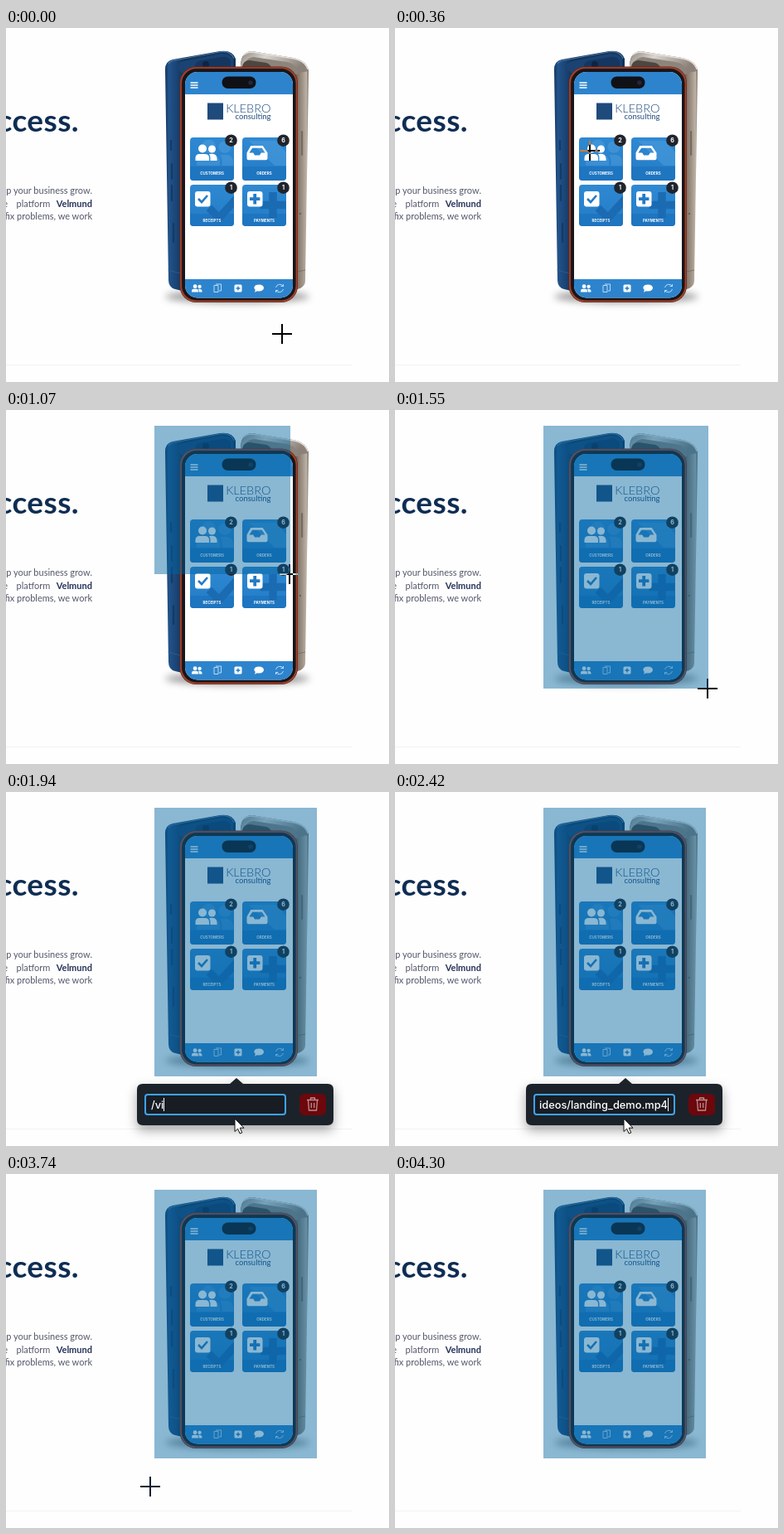
Write an HTML page that moves like this. It is 462 by 427 pixels and loops after 4690 ms.

```html
<!DOCTYPE html>
<html lang="en">
<head>
<meta charset="utf-8">
<title>Select an area and attach a video</title>
<style>
  html, body { margin: 0; width: 100%; height: 100%; overflow: hidden; background: #fefefe; }
  svg { display: block; }
  text { font-family: Lato, "Open Sans", sans-serif; }
  .end { text-anchor: end; }
  .mid { text-anchor: middle; }
  .title { font-size: 37px; font-weight: 700; letter-spacing: .4px; fill: #0f2d53; }
  .copy { font-size: 11px; fill: #54586a; }
  .copy .strong { font-weight: 700; fill: #26335a; }
  .logo { font-weight: 300; fill: #1f4a7c; }
  .label { font: 700 4.5px Inter, sans-serif; fill: #fff; }
  .count { font: 700 7.2px Inter, sans-serif; fill: #fff; }
  .path { font: 500 12.8px Inter, sans-serif; fill: #fff; }
  .cross { mix-blend-mode: difference; }
</style>
</head>
<body>
<svg width="462" height="427" viewBox="0 0 462 427">
  <defs>
    <linearGradient id="navy" gradientUnits="userSpaceOnUse" x1="192" y1="0" x2="214" y2="0">
      <stop offset="0" stop-color="#14365e"/>
      <stop offset=".2" stop-color="#22538a"/>
      <stop offset=".55" stop-color="#1b477a"/>
      <stop offset="1" stop-color="#123458"/>
    </linearGradient>
    <linearGradient id="metal" gradientUnits="userSpaceOnUse" x1="348" y1="0" x2="365" y2="0">
      <stop offset="0" stop-color="#5a5047"/>
      <stop offset=".3" stop-color="#897d71"/>
      <stop offset=".6" stop-color="#a3978a"/>
      <stop offset=".85" stop-color="#bdb2a6"/>
      <stop offset="1" stop-color="#776c61"/>
    </linearGradient>
    <linearGradient id="silver" x1="0" y1="0" x2="1" y2=".35">
      <stop offset="0" stop-color="#8f8780"/>
      <stop offset=".4" stop-color="#d9d5d0"/>
      <stop offset="1" stop-color="#8b8178"/>
    </linearGradient>
    <linearGradient id="tile" x1="0" y1="0" x2="0" y2="1">
      <stop offset="0" stop-color="#2f89d2"/>
      <stop offset="1" stop-color="#237bc6"/>
    </linearGradient>
    <filter id="soft" x="-30%" y="-100%" width="160%" height="300%"><feGaussianBlur stdDeviation="4"/></filter>
    <filter id="drop" x="-20%" y="-40%" width="140%" height="200%">
      <feDropShadow dx="0" dy="6" stdDeviation="7" flood-color="#000" flood-opacity=".35"/>
    </filter>
    <clipPath id="screen"><rect x="216" y="53" width="130" height="272.500" rx="15"/></clipPath>
    <clipPath id="cards">
      <path d="M222 132h53v52h-53zM285 132h53v52h-53zM222 189h53v50h-53zM285 189h53v50h-53z"/>
    </clipPath>
    <clipPath id="field"><rect x="174" y="365" width="158" height="24"/></clipPath>
    <g id="people">
      <circle cx="20" cy="6" r="4.500"/>
      <path d="M18 20v-4q0-2-1.500-4q9-1.500 9.500 5v3z"/>
      <circle cx="8.500" cy="5.500" r="5"/>
      <path d="M0 20v-3q0-5 5-5h6.500q5 0 5 5v3z"/>
    </g>
    <path id="tray" fill-rule="evenodd" d="M5 1h15l6 9v7q0 2-2 2H2q-2 0-2-2v-7zM7 4l-4 6h5l2 3h6l2-3h5l-4-6z"/>
    <rect id="box" width="18.500" height="18.500" rx="3"/>
    <path id="check" d="M4 9l4 4l7-8" fill="none" stroke-width="2.600"/>
    <path id="plus" d="M9.200 3v12.400M3 9.200h12.400" fill="none" stroke-width="3.800"/>
  </defs>

  <rect width="462" height="427" fill="#fefefe"/>
  <rect y="406" width="417" height="1" fill="#f2f2f2"/>
  <text class="end title" x="88" y="125">ccess.</text>
  <g class="copy">
    <text class="end" x="104" y="199.500">p your business grow.</text>
    <text class="end" x="2" y="215.500">e</text>
    <text x="12.500" y="215.500">platform</text>
    <text class="end strong" x="104" y="215.500">Velmund</text>
    <text class="end" x="104" y="230.500">fix problems, we work</text>
  </g>

  <!-- rear phones -->
  <ellipse cx="279" cy="324" rx="87" ry="8" fill="#555" opacity=".55" filter="url(#soft)"/>
  <path d="M192 50Q192 40 201 38L258 28Q273 26 277 37V60L225 320L204 315Q196 313 196 304Z" fill="url(#navy)"/>
  <path d="M205 48Q207 42 214 40L258 31Q271 30 274 38V54H212Z" fill="#1a4374"/>
  <path d="M196 43Q198 40 203 39L258 29Q271 27 275 37" fill="none" stroke="#4b76a6" stroke-width="1.200"/>
  <path d="M228 45q1-5 8-6l24-4q9-1 11 5v8h-43z" fill="#14365f"/>
  <circle cx="241" cy="44" r="4" fill="#0d2444"/>
  <path d="M199 136v11M200 164v18M200 190v18M202 236v22" stroke="#143a67" stroke-width="2.200" stroke-linecap="round"/>
  <path d="M195.500 292l15 4" stroke="#3b628f" stroke-width=".7"/>
  <path d="M283 44Q284 29 296 28L346 36Q363 39 365 52L361 305Q361 311 355 314L335 320L283 54Z" fill="url(#metal)"/>
  <path d="M283 46Q284 29 296 28L346 36Q363 39 365 52L353 54L283 53Z" fill="url(#silver)"/>
  <path d="M287 48Q288 36 299 35L338 41Q351 43 353 56L284 53Z" fill="#8d847b"/>
  <path d="M286 33Q290 29 297 29L345 36.500Q361 39 364 50" fill="none" stroke="#e6e1db" stroke-width="1.300"/>
  <path d="M285 47q1-8 9-8l20 3q6 2 7 9z" fill="#4d4641"/>
  <path d="M357 125v28" stroke="#766a5f" stroke-width="2.200" stroke-linecap="round"/>
  <path d="M351 294l10-2" stroke="#6f6459" stroke-width=".7"/>
  <circle cx="355" cy="224" r="1" fill="#5c5248"/>

  <!-- front phone -->
  <rect x="209.500" y="46.500" width="142.500" height="284.500" rx="20" fill="#5d2a20"/>
  <rect x="211" y="48" width="139.500" height="281.500" rx="18.500" fill="none" stroke="#a9422b" stroke-width="1.600"/>
  <rect x="212.300" y="49.300" width="137" height="279" rx="17.500" fill="#17161a"/>
  <g clip-path="url(#screen)">
    <rect x="216" y="53" width="130" height="273" fill="#fff"/>
    <rect x="216" y="53" width="130" height="27" fill="#2d84cd"/>
    <rect x="216" y="303" width="130" height="23" fill="#2d84cd"/>
  </g>
  <rect x="260.500" y="58.500" width="41" height="14.500" rx="7.200" fill="#101116"/>
  <circle cx="295" cy="66" r="2.800" fill="#20263d"/>
  <path d="M222.500 66h9M222.500 69h9M222.500 72h9" stroke="#fff" stroke-width="1.300"/>
  <rect x="243" y="90.500" width="19" height="20" fill="#1f4a7c"/>
  <g class="logo">
    <text class="end" x="319.500" y="102" font-size="14.500">KLEBRO</text>
    <text class="end" x="319.500" y="110" font-size="9.500" font-weight="400">consulting</text>
  </g>

  <g id="tiles"></g>
  <g clip-path="url(#cards)">
    <use href="#people" transform="translate(230 134) scale(1.7 1.6)" fill="#5aa5e2" opacity=".4"/>
    <path d="M293 136h33l12 14v16h-14z" fill="#4a9bdd" opacity=".6"/>
    <path d="M245 217l12 12l21-23" fill="none" stroke="#1b6bb3" stroke-width="9.500"/>
    <path d="M322 198v31M306.500 213.500h31" stroke="#1b6bb3" stroke-width="9.500"/>
  </g>
  <g fill="#fff">
    <use href="#people" transform="translate(228.500 140)"/>
    <use href="#tray" transform="translate(290.500 141) scale(.96)"/>
    <use href="#box" x="228" y="197"/>
    <use href="#box" x="291" y="197"/>
    <use href="#people" transform="translate(224 309) scale(.48)"/>
    <rect x="275.500" y="309.500" width="9" height="9" rx="1.500"/>
    <path d="M305 309.500c8 0 8 8 0 8q-1 0-2-.3l-3 1.600l.8-2.800c-3-3-1-6.500 4.200-6.500z"/>
  </g>
  <g stroke="#247bc6">
    <use href="#check" x="228" y="197"/>
    <use href="#plus" x="291" y="197"/>
    <path d="M280 311.500v5M277.500 314h5" stroke-width="1.400"/>
  </g>
  <g fill="none" stroke="#cfe4f6" stroke-width=".9">
    <path d="M251 310.500h5v8h-5zM253 309h6.500v8H257"/>
    <path d="M325.500 313a5 5 0 0 1 9-1.500v-2.500M334.500 311.500h-3M334.500 315a5 5 0 0 1-9 1.500v2.500M325.500 316.500h3"/>
  </g>
  <g id="badges"></g>

  <path id="cross" class="cross" d="M-12-1H-1V-12H1V-1H12V1H1V12H-1V1H-12Z"/>
  <rect id="area" x="179" y="19" fill="#00629d" fill-opacity=".46"/>

  <g id="popup">
    <path filter="url(#drop)" fill="#1d232a" d="M165 352h105l8-7l8 7h102q7 0 7 7v36q0 7-7 7H165q-7 0-7-7v-36q0-7 7-7z"/>
    <rect x="168" y="365" width="169" height="24" rx="3" fill="#181d24" stroke="#3ea3f2" stroke-width="2"/>
    <g clip-path="url(#field)">
      <text id="typed" class="path" y="382"></text>
      <rect id="caret" y="369" width="1" height="16" fill="#fff"/>
    </g>
    <rect x="354" y="364" width="32" height="26" rx="6" fill="#6c070c"/>
    <path d="M363 371.500h14M367.500 371v-2h5v2M364.500 372l1 12h9l1-12M368.300 375v6M371.700 375v6" fill="none" stroke="#b78f91" stroke-width="1.300"/>
  </g>
  <path id="arrow" d="M0 0V15.500L3.600 12.200L6.200 18L8.800 16.900L6.200 11.200H11Z" fill="#fff" stroke="#111" stroke-width="1"/>
</svg>

<script>
const LOOP = 4690;
const $ = id => document.getElementById(id);
const cross = $("cross"), area = $("area"), popup = $("popup");
const typed = $("typed"), caret = $("caret"), arrow = $("arrow");

// app tiles: x, y, height, label, badge
const tiles = [
  [222, 132, 52, "CUSTOMERS", 2], [285, 132, 52, "ORDERS", 6],
  [222, 189, 50, "RECEIPTS", 1], [285, 189, 50, "PAYMENTS", 1],
];
for (const [x, y, h, label, count] of tiles) {
  $("tiles").innerHTML += `
    <rect x="${x}" y="${y}" width="53" height="${h}" rx="4" fill="url(#tile)"/>
    <path d="M${x} ${y + 35}h53v${h - 39}q0 4-4 4h-45q-4 0-4-4z" fill="#1c73be" opacity=".7"/>`;
  $("badges").innerHTML += `
    <text class="label mid" x="${x + 26.5}" y="${y + 45.3}">${label}</text>
    <circle cx="${x + 49.5}" cy="${y + 3.7}" r="7.3" fill="#20242c"/>
    <text class="count mid" x="${x + 49.5}" y="${y + 6.3}">${count}</text>`;
}

// pointer samples: time, x, y; each holds until the next
const pointer = [
  [0, 333, 369], [70, 328, 355], [145, 307, 308], [220, 272, 232],
  [295, 235, 148], [370, 204, 80], [445, 185, 36], [520, 178, 20],
  [830, 184, 26], [910, 220, 62], [990, 287, 132], [1070, 342, 198],
  [1150, 365, 262], [1230, 374, 318], [1310, 376, 330], [1390, 377, 335],
  [1470, 377, 336], [1630, 374, 343], [1710, 330, 370], [1790, 276, 394],
  [3210, 276, 393], [3520, 264, 391], [3597, 228, 385], [3674, 174, 377],
  [3750, 114, 369], [3827, 58, 363], [3904, 14, 359], [3980, -20, 356],
];
const file = "/videos/landing_demo.mp4";
const typing = [[0, 0], [1940, 3], [2020, 8], [2100, 12], [2180, 16], [2260, 21], [2420, file.length]];

const at = (keys, t) => keys.findLast(k => k[0] <= t);
const show = (el, on) => el.setAttribute("visibility", on ? "inherit" : "hidden");
const place = (el, x, y) => el.setAttribute("transform", `translate(${x} ${y})`);

function draw(t) {
  const [, x, y] = at(pointer, t);
  const open = t >= 1710 && t < 3210;
  place(cross, x, y);
  place(arrow, x, y);
  show(cross, !open);
  show(arrow, open);
  show(popup, open);
  cross.setAttribute("fill", t < 3210 ? "#fff" : "#f3dfcf");

  const dragging = t < 1630;
  show(area, t >= 830);
  area.setAttribute("width", dragging ? Math.max(0, x + 1 - 179) : 196);
  area.setAttribute("height", dragging ? Math.max(0, y - 19) : 324);

  const text = file.slice(0, at(typing, t)[1]);
  if (typed.textContent !== text) typed.textContent = text;
  const width = text ? typed.getComputedTextLength() : 0;
  const left = Math.min(175, 329 - width);
  typed.setAttribute("x", left);
  caret.setAttribute("x", Math.round(left + width));
  show(caret, t < 2900);
}

const start = performance.now();
function tick() {
  draw((performance.now() - start) % LOOP);
  requestAnimationFrame(tick);
}
tick();
</script>
</body>
</html>
```
